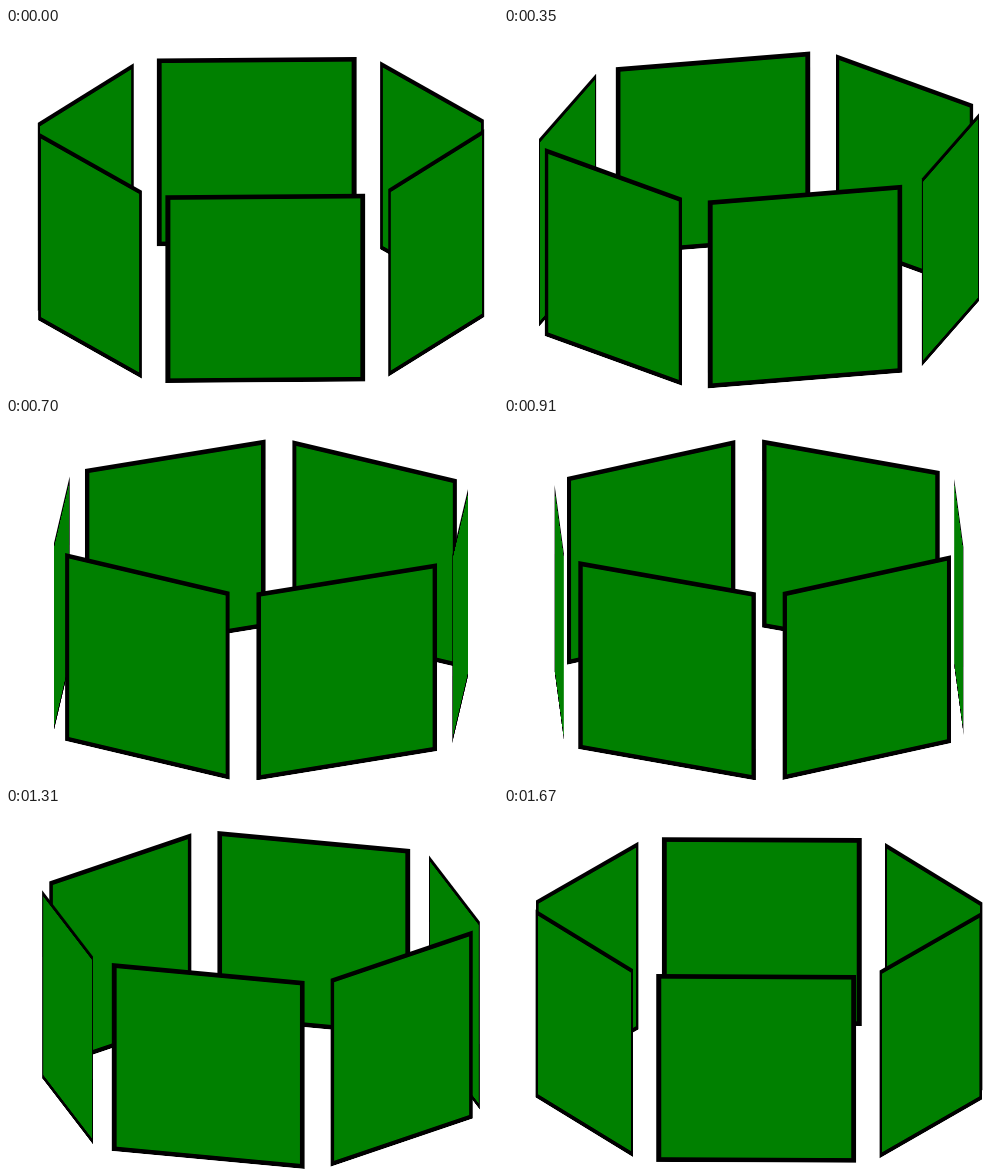
An HTML page that plays this animation: 492x362 px, repeating every 1.74 s.

```html
<!DOCTYPE html>
<html lang="en">
<head>
<meta charset="utf-8">
<title>Turning panels</title>
<style>
  html, body { margin: 0; width: 100%; height: 100%; overflow: hidden; background: #fff; }
  #ring { position: absolute; left: 255px; top: 192px; transform-style: preserve-3d; }
  #ring div {
    position: absolute; left: -100px; top: -100px;
    box-sizing: border-box; width: 200px; height: 200px;
    background: #008000; border: 5px solid #000;
  }
</style>
</head>
<body>
<div id="ring"></div>
<script>
const ring = document.getElementById('ring');
for (let i = 0; i < 6; i++) {
  const panel = document.createElement('div');
  panel.style.transform = `rotateY(${i * 60}deg) translateZ(200px)`;
  ring.append(panel);
}

// The ring turns in 25 hard steps, a few of them slightly shorter or longer
const delays = Array(25).fill(70);
delays[15] = delays[20] = 60;
delays[21] = 80;
const loop = delays.reduce((sum, d) => sum + d);

function stepAt(time) {
  let step = 0;
  for (let rest = time % loop; rest >= delays[step]; step++) rest -= delays[step];
  return step;
}

function draw() {
  const angle = 1.25 + 2.415 * stepAt(performance.now());
  ring.style.transform = `rotateX(-20deg) rotateY(${angle}deg)`;
  requestAnimationFrame(draw);
}
draw();
</script>
</body>
</html>
```
